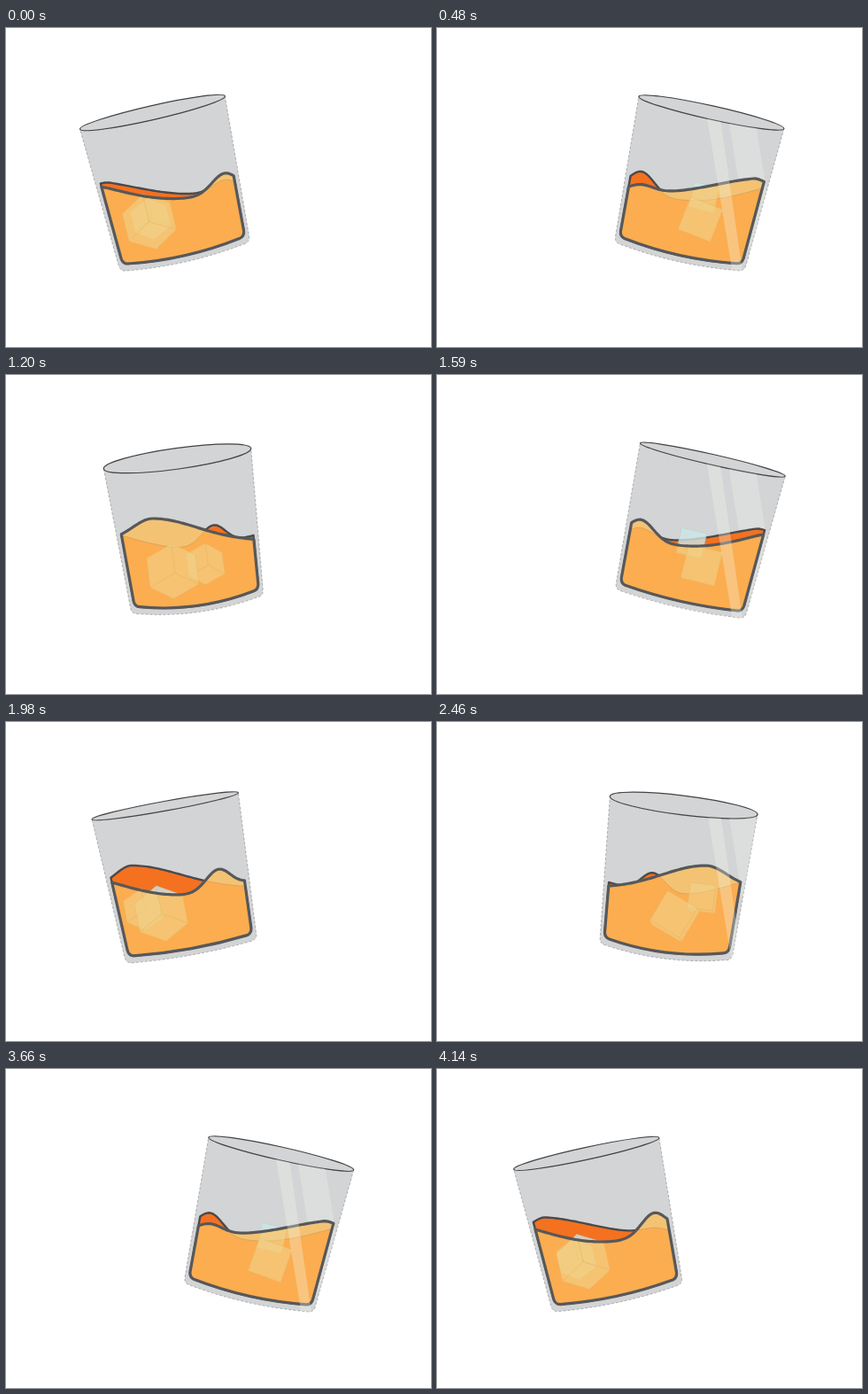
An HTML page for the animation above (4200 ms loop, 480x360 px).

```html
<!DOCTYPE html>
<html lang="en">
<head>
<meta charset="utf-8">
<title>Swirling glass</title>
<style>
  html, body { margin: 0; width: 100%; height: 100%; overflow: hidden; background: #fff; }
  svg { display: block; width: 100vw; height: 100vh; }
</style>
</head>
<body>
<svg viewBox="0 0 480 360">
  <defs>
    <clipPath id="glassClip"><path id="glassClipPath"/></clipPath>
    <clipPath id="liquidClip"><path id="liquidClipPath"/></clipPath>
  </defs>
  <g id="glass">
    <path id="body" fill="#d3d4d6" stroke="#444" stroke-width=".6" stroke-dasharray="3 2" stroke-opacity=".55"/>
    <ellipse id="rim" cy="-83" rx="84" fill="#d3d4d6" stroke="#434345" stroke-width="1.2"/>
  </g>
  <g clip-path="url(#glassClip)">
    <path d="M328 95h30L387 275H357Z" fill="#f1f8ec" opacity=".28"/>
  </g>
  <path id="back" fill="#f4711f" stroke="#4a4a4c" stroke-width="2.4" stroke-linejoin="round"/>
  <path id="iceAbove" fill="#cfe6e6" fill-opacity=".8" stroke="#b5d0d0" stroke-width=".6"/>
  <path id="surface" fill="#f4c273"/>
  <path id="liquid" fill="#fbad50" stroke="#dca45a" stroke-width="1"/>
  <g clip-path="url(#liquidClip)" fill="#f0d58f" fill-opacity=".55" stroke="#e8b866" stroke-opacity=".6" stroke-width=".8">
    <path id="iceSmall"/>
    <path id="iceBig"/>
  </g>
  <path id="outline" fill="none" stroke="#57585a" stroke-width="3.2" stroke-linejoin="round"/>
  <g clip-path="url(#glassClip)">
    <path d="M304 95h15L345 275H333.500Z" fill="#f1f8ec" opacity=".3"/>
  </g>
</svg>
<script>
const LOOP = 4200, FRAMES = 117, SWINGS = 4, TAU = Math.PI * 2;
const $ = id => document.getElementById(id);
const lerp = (a, b, t) => a + (b - a) * t;
const smoothstep = t => (t = Math.min(1, Math.max(0, t)), t * t * (3 - 2 * t));
const bell = (x, width) => Math.exp(-((x / width) ** 2));
const setPath = (id, d) => $(id).setAttribute('d', d);
const pair = p => p[0].toFixed(2) + ' ' + p[1].toFixed(2);

// Animation frames last 30 ms, every fifth one 60 ms.
function frameAt(ms) {
  if (ms < 30) return 0;
  const block = Math.floor(ms / 180), slot = Math.floor(ms % 180 / 30);
  return block * 5 + 1 + Math.max(0, slot - 1);
}

// Height of one surface edge at u = 0 (left wall) to 1 (right wall).
// A broad swell runs left to right, then a narrow crest over a trough does.
function wave(phase) {
  const cos = Math.cos(phase), sin = Math.sin(phase);
  const swellAt = 0.5 - 0.43 * cos;
  const crestAt = 0.5 + 0.43 * Math.sign(cos) * Math.abs(cos) ** 1.6;
  const blend = smoothstep((sin + 0.3) / 0.9);
  return u => {
    const reach = 0.1 + 0.48 * (u < swellAt ? swellAt : 1 - swellAt);
    const swell = 187 - 25 * bell(u - swellAt, reach);
    const crest = 181 + 14 * Math.sin(Math.PI * u) - 23 * bell(u - crestAt, 0.13);
    return lerp(crest, swell, blend);
  };
}

const faces = [0, 1, 2].flatMap(axis => [-1, 1].map(side =>
  [0, 1, 2, 3].map(k => {
    const angle = (k + 0.5) * TAU / 4, v = [];
    v[axis] = side;
    v[(axis + 1) % 3] = Math.sign(Math.cos(angle));
    v[(axis + 2) % 3] = Math.sign(Math.sin(angle));
    return v;
  })));

function cubePath(cx, cy, half, yaw, pitch, roll) {
  const turn = (a, b, r) => [a * Math.cos(r) - b * Math.sin(r), a * Math.sin(r) + b * Math.cos(r)];
  const project = ([x, y, z]) => {
    [x, z] = turn(x, z, yaw);
    [y, z] = turn(y, z, pitch);
    [x, y] = turn(x, y, roll);
    return [cx + x * half, cy + y * half, z];
  };
  return faces.map(face => face.map(project))
    .filter(face => face.reduce((sum, v) => sum + v[2], 0) > 0.1)
    .map(face => 'M' + face.map(pair).join('L') + 'Z').join('');
}

function draw(ms) {
  const phase = TAU * (frameAt(ms) - 0.5) / (FRAMES / SWINGS);
  const cos = Math.cos(phase), sin = Math.sin(phase);
  const cx = 238.5 - 55 * cos, cy = 176.5, tilt = -12.9 * cos;
  const rad = tilt * Math.PI / 180, c = Math.cos(rad), s = Math.sin(rad);
  const place = (x, y) => [cx + x * c - y * s, cy + x * s + y * c];
  const at = (x, y) => pair(place(x, y));

  const ry = 7.5 + 4.8 * Math.sin(phase + 0.2), bulge = 0.65 * ry;
  const move = `translate(${cx} ${cy}) rotate(${tilt})`;
  const body = `M-84-83A84 ${ry} 0 0 0 84-83L75.500 77Q75 84 68 84.500` +
    `Q0 ${84 + 2 * bulge} -68 84.500Q-75 84 -75.500 77Z`;
  $('glass').setAttribute('transform', move);
  $('rim').setAttribute('ry', ry);
  setPath('body', body);
  setPath('glassClipPath', body);
  $('glassClipPath').setAttribute('transform', move);

  // Liquid: front and rear edges of the surface between the slanted walls.
  const wallX = (side, y) => {
    const [x0, y0] = place(side * 75, -20), [x1, y1] = place(side * 70.2, 76);
    return lerp(x0, x1, (y - y0) / (y1 - y0));
  };
  const base = `L${at(71, 70)}Q${at(70.2, 76)} ${at(65, 77)}Q${at(0, 77 + 2 * bulge)} ` +
    `${at(-65, 77)}Q${at(-70.2, 76)} ${at(-71, 70)}Z`;
  const vessel = height => {
    const left = wallX(-1, height(0)), right = wallX(1, height(1)), points = [];
    for (let i = 0; i <= 60; i++) points.push([lerp(left, right, i / 60), height(i / 60)]);
    return 'M' + points.map(pair).join('L') + base;
  };
  const front = wave(phase), rear = wave(-phase);
  const frontPath = vessel(front);
  setPath('back', vessel(rear));
  setPath('surface', frontPath);
  setPath('liquid', vessel(u => Math.max(front(u), rear(u))));
  setPath('liquidClipPath', frontPath);
  setPath('outline', frontPath);

  // Ice cubes turn from corner-on to face-on as the glass swings.
  const cornerOn = smoothstep((1 + cos) / 2);
  const yaw = cornerOn * Math.PI / 4, pitch = cornerOn * 0.615;
  const roll = (-14 * cos + 32 * Math.max(0, sin) * (1 - cornerOn)) * Math.PI / 180;
  const big = cubePath(cx - 8 - 14 * cos, 217 + 4 * sin + 2 * cos, 19.5, yaw, pitch, roll);
  const small = cubePath(cx - 8 - 8 * cos + 42 * sin, 203 + 13 * cos + 3 * sin, 14.5, yaw * 0.9, pitch, rad);
  setPath('iceBig', big);
  setPath('iceSmall', small);
  setPath('iceAbove', big + small);
}

const start = performance.now();
function tick() {
  draw((performance.now() - start) % LOOP);
  requestAnimationFrame(tick);
}
draw(0);
requestAnimationFrame(tick);
</script>
</body>
</html>
```
